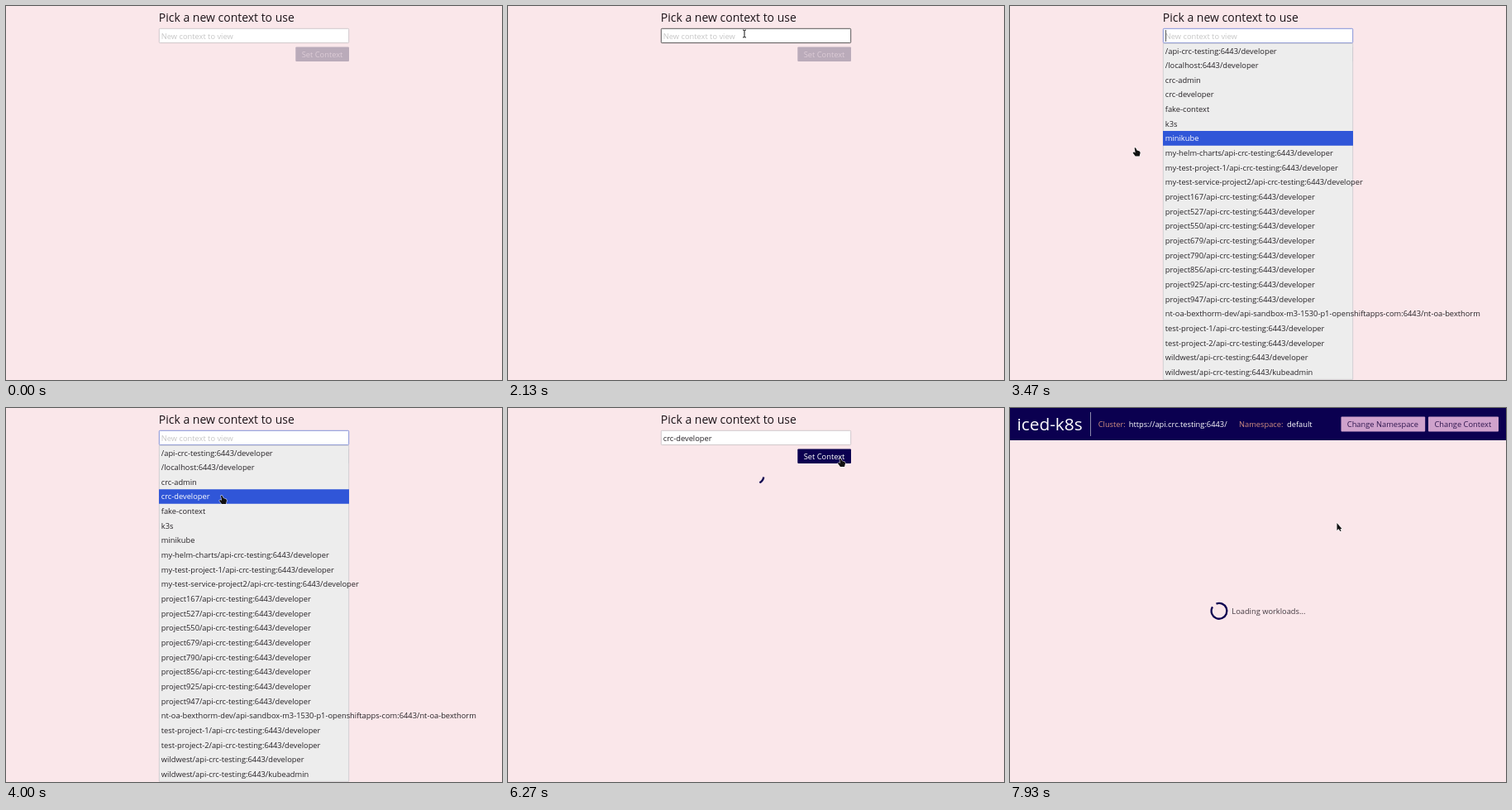
An HTML page with a canvas that plays this animation: 600 by 452 pixels, repeating every 8 s.

```html
<!DOCTYPE html>
<html lang="en">
<head>
<meta charset="utf-8">
<title>Context picker</title>
<style>
  html, body { margin: 0; width: 100%; height: 100%; overflow: hidden; background: #fae7ea; }
  canvas { display: block; }
</style>
</head>
<body>
<canvas id="stage" width="600" height="452"></canvas>
<script>
const g = document.getElementById('stage').getContext('2d');
const LOOP = 8000, STEP = 200 / 3;
const ENTER = 130, FOCUS = 2060, OPEN = 2330, PICKED = 5530, PRESSED = 6260, LOADED = 6330;
const NAVY = '#0b0050', INK = '#262226', BODY = 9.3;
const ROW_TOP = 45.2, ROW = 17.65;

const api = '/api-crc-testing:6443/developer';
const user = 'nt-oa-bexthorm';
const contexts = [
  api, '/localhost:6443/developer', 'crc-admin', 'crc-developer', 'fake-context', 'k3s', 'minikube',
  'my-helm-charts' + api, 'my-test-project-1' + api, 'my-test-service-project2' + api,
  ...'167 527 550 679 790 856 925 947'.split(' ').map(n => 'project' + n + api),
  `${user}-dev/api-sandbox-m3-1530-p1-openshiftapps-com:6443/${user}`,
  'test-project-1' + api, 'test-project-2' + api, 'wildwest' + api,
  'wildwest/api-crc-testing:6443/kubeadmin'
];

// The pointer rests between glides; each glide is a quadratic curve from the last stop.
const glides = [];
let stop = [447, 209];
function glide(start, end, to, via) {
  const from = stop;
  via ||= from.map((v, i) => (v + to[i]) / 2);
  glides.push({ start, end, from, via, to });
  stop = to;
}
glide(ENTER, 333, [370, 13], [143, -11]);
glide(633, 1267, [365, -4]);
glide(1400, 1600, [280, 45], [330, 0]);
glide(2000, 2133, [286, 33]);
glide(2400, 2467, [280, 51]);
glide(2867, 3133, [271, 139]);
glide(3333, 3600, [62, 217], [139, 165]);
glide(3600, 4000, [262, 106], [110, -110]);
glide(4133, 5000, [238, 102], [298, 118]);
glide(5600, 5933, [417, 60], [340, 125]);
glide(5933, 6133, [403, 61], [417, 0]);
glide(6733, 7067, [428, 20]);
glide(7067, 7933, [395.5, 139], [435, 70]);

function pointer(t) {
  const { start, end, from, via, to } = glides.findLast(s => s.start <= t) || glides[0];
  const p = Math.max(0, Math.min(1, (t - start) / (end - start))), q = 1 - p;
  return from.map((v, i) => q * q * v + 2 * p * q * via[i] + p * p * to[i]);
}

function rect(x, y, w, h, fill, stroke, r = 1) {
  g.beginPath();
  g.roundRect(x, y, w, h, r);
  g.fillStyle = fill;
  g.fill();
  if (stroke) {
    g.strokeStyle = stroke;
    g.lineWidth = 0.75;
    g.stroke();
  }
}

function text(s, x, y, color = INK, size = BODY) {
  g.font = `${size}px "Open Sans", "Noto Sans", sans-serif`;
  g.fillStyle = color;
  g.fillText(s, x, y);
}

// Cubic bezier (0.2, 0) (0, 1), solved for x by bisection
function ease(x) {
  let lo = 0, hi = 1, s;
  for (let i = 0; i < 20; i++) {
    s = (lo + hi) / 2;
    if (0.6 * (1 - s) ** 2 * s + s ** 3 < x) lo = s; else hi = s;
  }
  return 3 * (1 - s) * s * s + s ** 3;
}

// An arc that grows for one half cycle and shrinks for the next while it turns
function spinner(x, y, ms) {
  const TURN = 2 * Math.PI, MIN = Math.PI / 8, WRAP = TURN * 7 / 8, CYCLE = 600;
  const half = Math.floor(ms / CYCLE), e = WRAP * ease(ms / CYCLE - half);
  const start = TURN * ms / 2000 + Math.floor(half / 2) * (WRAP + TURN / 80);
  const shrinking = half % 2;
  g.beginPath();
  g.arc(x, y, 9.4, start + (shrinking ? e : 0), start + MIN + (shrinking ? WRAP : e));
  g.strokeStyle = NAVY;
  g.lineWidth = 2.3;
  g.stroke();
}

const shapes = {
  arrow: new Path2D('M0 0V9L2 7 4 10 5 10 4 7H6Z'),
  hand: new Path2D('M-2 0Q-1-1 0 1L1 3 4 4Q5 5 5 6L4 10H-1L-4 6Q-3 4-1 6Z'),
  beam: new Path2D('M-2-4Q0-4 0-3 0-4 2-4M0-3V4M-2 5Q0 5 0 4 0 5 2 5')
};

function pointerKind(t, x, y) {
  if (t >= FOCUS && t < 2930) return 'beam';
  const onList = t >= OPEN && t < PICKED;
  const onButton = t < LOADED ? t >= 6100 : y < 29 && x > 400;
  return onList || onButton ? 'hand' : 'arrow';
}

function drawPointer(t) {
  if (t < ENTER) return;
  const [x, y] = pointer(t), kind = pointerKind(t, x, y), shape = shapes[kind];
  g.save();
  g.translate(x, y);
  g.lineJoin = 'round';
  g.lineWidth = kind === 'beam' ? 2 : 1.2;
  g.strokeStyle = 'rgba(255,255,255,.8)';
  g.stroke(shape);
  g.lineWidth = 1;
  g.strokeStyle = g.fillStyle = '#111';
  if (kind === 'beam') g.stroke(shape); else g.fill(shape);
  g.restore();
}

// Row last touched by the pointer
function hoveredRow(t) {
  for (; t >= OPEN; t -= STEP) {
    const [x, y] = pointer(t);
    if (x > 185 && x < 415 && y > ROW_TOP) return Math.floor((y - ROW_TOP) / ROW);
  }
  return -1;
}

function drawList(t) {
  const active = hoveredRow(t);
  rect(185.3, 45.3, 229.4, 406, '#ededed', '#c6c6cb', 0);
  if (active >= 0) rect(185, ROW_TOP + active * ROW, 230, ROW, '#3056d8', null, 0);
  contexts.forEach((name, i) =>
    text(name, 187.8, ROW_TOP + i * ROW + 12.3, i === active ? '#fff' : INK));
}

function drawPicker(t) {
  const open = t >= OPEN && t < PICKED, picked = t >= PICKED;
  text('Pick a new context to use', 184.8, 19, '#1c1419', 14);
  const border = open ? '#5a70cc' : t >= FOCUS && t < OPEN ? '#222' : '#c0babe';
  rect(185.3, 27.3, 229.4, 17.3, '#fff', border);
  if (picked) text('crc-developer', 187.8, 39.6);
  else text('New context to view', 187.8, 39.6, '#c6c6c6');
  const blinkOn = Math.floor((t - OPEN - 36) / 500) % 2 === 0;
  if (open && blinkOn) rect(188, 29, 0.8, 14, '#333', null, 0);
  rect(350.3, 49.5, 64.7, 17.5, picked ? NAVY : '#baabba');
  text('Set Context', 357.7, 62, picked ? '#fff' : '#dccbd6');
  if (open) drawList(t);
  if (t >= PRESSED) spinner(300, 82, t - PRESSED + 43);
}

function drawWorkloads(t) {
  rect(0, 0, 600, 39, NAVY, null, 0);
  text('iced-k8s', 8.6, 26.8, '#fff', 20.8);
  rect(97, 5, 1, 29, '#8f8bac', null, 0);
  text('Cluster:', 106.7, 23, '#d08d80');
  text('https://api.crc.testing:6443/', 143.7, 23, '#fff');
  text('Namespace:', 277, 23, '#d08d80');
  text('default', 335, 23, '#fff');
  rect(400.5, 10.5, 101.7, 18, '#cfa2cc');
  text('Change Namespace', 407.8, 23, '#30174f');
  rect(506, 10.5, 85, 18, '#cfa2cc');
  text('Change Context', 513.4, 23, '#30174f');
  spinner(253, 245.3, t - LOADED);
  text('Loading workloads...', 268.3, 249, '#453b42');
}

function frame() {
  const now = performance.now() % LOOP;
  const t = Math.floor((now + 4) / STEP) * STEP;
  g.fillStyle = '#fae7ea';
  g.fillRect(0, 0, 600, 452);
  if (t < LOADED) drawPicker(t); else drawWorkloads(t);
  drawPointer(t);
  requestAnimationFrame(frame);
}
frame();
</script>
</body>
</html>
```
